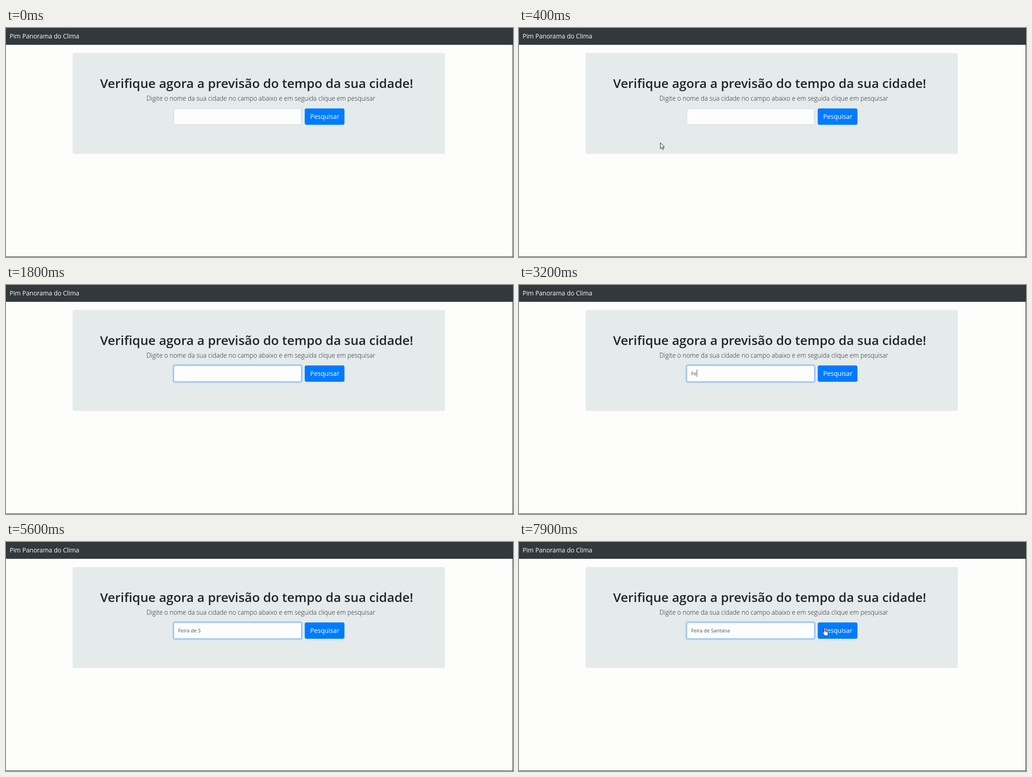
An HTML page that plays this animation: 1110x504 px, repeating every 8 s.

```html
<!DOCTYPE html>
<html lang="pt-BR">
<head>
<meta charset="utf-8">
<title>Previsão</title>
<style>
  html, body { margin: 0; width: 100%; height: 100%; overflow: hidden; }
  body {
    position: relative;
    background: #fdfdfc;
    color: #212529;
    font-family: "Open Sans", "Noto Sans", sans-serif;
  }
  body * { position: absolute; box-sizing: border-box; margin: 0; }
  .text { line-height: 40px; white-space: pre; }

  #nav { left: 0; top: 0; width: 1110px; height: 37px; background: #32383c; }
  #brand { left: 8px; top: -2px; font-size: 13.6px; color: #fff; }
  #edge { left: 0; top: 0; width: 1110px; height: 504px; border: solid #2b2f33; border-width: 0 1px 1px 0; }
  #panel { left: 146px; top: 55px; width: 815px; height: 222px; border-radius: 4px; background: #e5eaeb; }
  #title { left: 206px; top: 101px; font-size: 27.88px; font-weight: 600; }
  #hint { left: 307.5px; top: 135px; font-size: 13.83px; font-weight: 300; }
  #field {
    left: 367px; top: 177px; width: 280px; height: 36px;
    border: 1px solid #ced4da; border-radius: 3px; background: #fdfdfc;
  }
  #typed { left: 377px; top: 175px; font-size: 10.9px; color: #495057; }
  #words { position: static; }
  #caret { left: 100%; top: 11px; width: 1px; height: 16px; background: #495057; }
  #button { left: 654px; top: 177px; width: 87px; height: 36px; border-radius: 4px; background: #007bff; }
  #label { left: 666px; top: 175px; font-size: 14px; color: #fff; }
  #trace { left: 0; top: 0; width: 5px; height: 1px; background: #ececec; }
  svg { left: 0; top: 0; overflow: visible; fill: #fff; stroke: #111; stroke-linejoin: round; }
</style>
</head>
<body>
  <div id="nav"></div>
  <div id="edge"></div>
  <div id="brand" class="text">Pim Panorama do Clima</div>
  <div id="panel"></div>
  <h2 id="title" class="text">Verifique agora a previsão do tempo da sua cidade!</h2>
  <p id="hint" class="text">Digite o nome da sua cidade no campo abaixo e em seguida clique em pesquisar</p>
  <div id="field"></div>
  <div id="trace"></div>
  <div id="typed" class="text"><span id="words"></span><i id="caret"></i></div>
  <div id="button"></div>
  <div id="label" class="text">Pesquisar</div>
  <svg id="arrow" width="12" height="18">
    <path d="M.5 .5V13.6L3.5 10.8 5.7 15.6 7.8 14.7 5.7 10H9.6Z"/>
  </svg>
  <svg id="hand" width="14" height="20">
    <path d="M3.5 11V2Q3.5 .5 4.8 .5T6.1 2V7Q8.2 6 8.6 7.8 10.4 7 10.8 8.6 12.6 8.2 12.6 10V14.5Q12.6 16.5 11.2 18.5H5.2Q4 16 1.4 13.2 -.2 11 1.2 10.4 2.2 10 3.5 11.8Z"/>
    <path d="M6.1 7V10M8.6 8V10.5M10.8 9V11" fill="none"/>
  </svg>

<script>
const LOOP = 8000, STEP = 100, BLINK = 530, FOCUS = 1240;
const CITY = "Feira de Santana";
// Moment of each key press, one per letter of CITY
const KEYS = [2450, 3200, 3300, 3600, 3700, 3900, 4100, 4200,
              4370, 5000, 5900, 6000, 6270, 6800, 6900, 7070];
// Pointer way points: time, x, y
const ENTER = [[100, 62, 482], [250, 200, 345], [400, 309, 252], [600, 384, 208]];
const LEAVE = [[7700, 540, 162], [7800, 625, 151], [7900, 664, 188]];

const $ = id => document.getElementById(id);
const show = (el, on) => { el.style.visibility = on ? "visible" : "hidden"; };
const place = (el, x, y) => { el.style.transform = `translate(${x}px, ${y}px)`; };
const within = (t, a, b) => t >= a && t < b;
const clamp = k => Math.min(1, Math.max(0, k));

function along(points, t) {
  let i = 1;
  while (i < points.length - 1 && t > points[i][0]) i++;
  const [a, b] = [points[i - 1], points[i]];
  const k = clamp((t - a[0]) / (b[0] - a[0]));
  return [1, 2].map(n => Math.round(a[n] + (b[n] - a[n]) * k));
}

function drawField(t) {
  const k = clamp((t - FOCUS) / 150);
  const mix = (a, b) => Math.round(a + (b - a) * k);
  const { style } = $("field");
  style.borderColor = `rgb(${mix(206, 128)}, ${mix(212, 189)}, ${mix(218, 255)})`;
  style.boxShadow = `0 0 0 ${2.5 * k}px rgba(0, 123, 255, ${0.25 * k})`;

  const count = KEYS.filter(key => key <= t).length;
  const since = t - (count ? KEYS[count - 1] : FOCUS);
  $("words").textContent = CITY.slice(0, count);
  $("caret").style.marginLeft = count ? "0" : "-1px";
  show($("caret"), since >= 0 && Math.floor(since / BLINK) % 2 === 0);
}

function drawPointer(t) {
  const entering = within(t, 100, 600);
  show($("arrow"), entering || within(t, 7700, 7900));
  place($("arrow"), ...along(entering ? ENTER : LEAVE, t));
  show($("hand"), t >= 7900);
  place($("hand"), ...along(LEAVE, t));

  // The text pointer is nearly white and leaves only a faint tick
  show($("trace"), within(t, 700, 4200));
  place($("trace"), ...(t < 1000 ? [402, 196] : [408, 185]));
}

function draw(now) {
  const t = Math.floor((now % LOOP) / STEP) * STEP;
  drawField(t);
  drawPointer(t);
  requestAnimationFrame(draw);
}
draw(performance.now());
</script>
</body>
</html>
```
